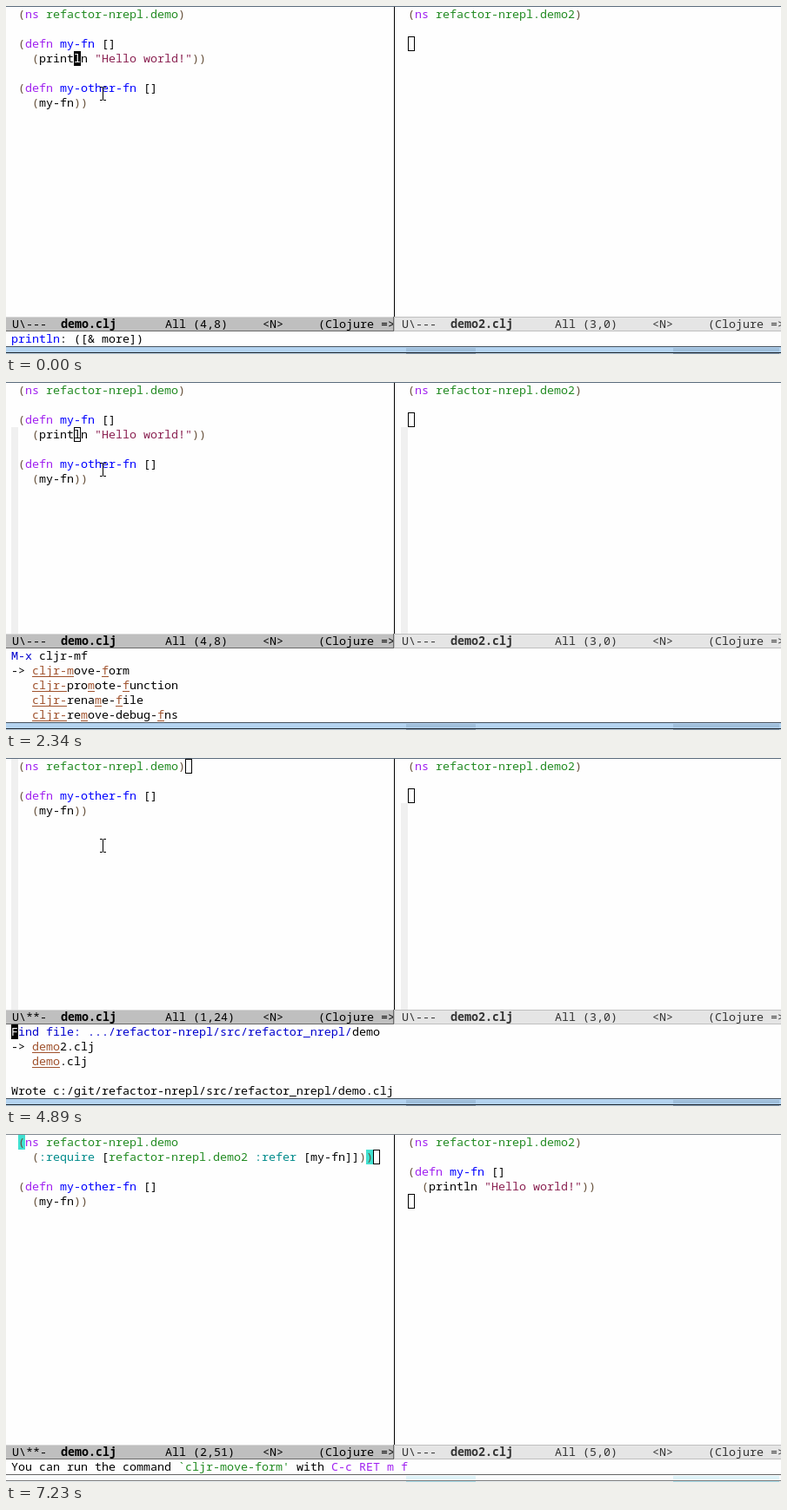
Write an HTML page with a canvas that moves like this. It is 891 by 401 pixels and loops after 7330 ms.

```html
<!DOCTYPE html>
<html lang="en">
<head>
<meta charset="utf-8">
<title>Move form</title>
<style>
html, body { margin: 0; width: 100%; height: 100%; overflow: hidden; background: #fefefe; }
canvas { display: block; }
</style>
</head>
<body>
<canvas id="stage" width="891" height="401"></canvas>
<script>
const ctx = document.getElementById('stage').getContext('2d', { alpha: false });
const LOOP = 7330, W = 891, H = 401, CW = 8, RH = 17;
const LEFT = 14, RIGHT = 462, MINI = 6, SPLIT = 446;
const FONT = '13.333px "Noto Sans Mono", "DejaVu Sans Mono", monospace';
const C = {
  bg: '#fefefe', ink: '#000', dim: '#66503a', key: '#a020f0', type: '#228b22',
  fn: '#0000ff', str: '#8b2252', kw: '#008b8b', prompt: '#0000cd',
  match: '#a0522d', paren: '#40e0d0', fringe: '#f0f0f0'
};

const rowY = row => 1 + row * RH;

function rect(x, y, w, h, color) {
  ctx.fillStyle = color;
  ctx.fillRect(x, y, w, h);
}

// Draws text at a row and returns the x where it ends.
function text(s, x, row, color = C.ink, bold = false) {
  ctx.font = (bold ? 'bold ' : '') + FONT;
  ctx.fillStyle = color;
  ctx.fillText(s, x, rowY(row) + 13);
  return x + s.length * CW;
}

function block(x, row, ch = '') {
  rect(x, rowY(row), CW, RH, '#000');
  text(ch, x, row, '#fff');
}

function hollow(x, row) {
  ctx.strokeStyle = '#000';
  ctx.lineWidth = 1;
  ctx.strokeRect(x + .5, rowY(row) + .5, CW - 1, RH - 1);
}

function tokenColor(tok, prev) {
  if (/[()]/.test(tok)) return C.dim;
  if (tok[0] === '"') return C.str;
  if (tok[0] === ':') return C.kw;
  if (tok === 'ns' || tok === 'defn') return C.key;
  if (prev === 'defn') return C.fn;
  return tok.startsWith('refactor-') ? C.type : C.ink;
}

function code(lines, x0) {
  lines.forEach((line, row) => {
    let x = x0, prev = '';
    for (const tok of line.match(/"[^"]*"|[()\[\]]|:?[\w.-]+|\s+/g) || []) {
      x = text(tok, x, row, tokenColor(tok, prev));
      if (tok.trim()) prev = tok;
    }
  });
}

const FORM = ['(defn my-fn []', '  (println "Hello world!"))'];
const CALL = ['(defn my-other-fn []', '  (my-fn))'];
const NS = '(ns refactor-nrepl.demo)', NS2 = '(ns refactor-nrepl.demo2)';
const BEFORE = [NS, '', ...FORM, '', ...CALL];
const CUT = [NS, '', ...CALL];
const AFTER = ['(ns refactor-nrepl.demo', '  (:require [refactor-nrepl.demo2 :refer [my-fn]]))', '', ...CALL];
const TARGET = [NS2, '', ...FORM];

function modeLine(x, w, row, active, flags, file, pos) {
  const y = rowY(row), ink = active ? '#000' : '#333', x0 = active ? 7 : 455;
  const light = active ? '#d8d8d8' : '#bfbfbf', dark = active ? '#6a6a6a' : '#bfbfbf';
  rect(x, y, w, RH, active ? '#bfbfbf' : '#e5e5e5');
  const put = (s, col, bold) => text(s, x0 + col * CW, row, ink, bold);
  ctx.save();
  ctx.beginPath();
  ctx.rect(x, y, w, RH);
  ctx.clip();
  put(flags, 0);
  put(file, 7, true);
  put('All ' + pos, 22);
  put('<N>', 36);
  put('(Clojure =>', 44);
  ctx.restore();
  rect(x, y, w, 1, light);
  rect(x, y + RH - 1, w, 1, dark);
  if (active) rect(x + w - 1, y, 1, RH, dark);
  else rect(x, y, 1, RH, light);
}

// Underlines the query letters as they appear in order.
function candidate(s, query, row) {
  let next = 0;
  [...s].forEach((ch, i) => {
    const x = 30 + i * CW, hit = next < query.length && ch === query[next];
    text(ch, x, row, hit ? C.match : C.ink);
    if (hit) {
      rect(x, rowY(row) + 15, CW, 1, C.match);
      next++;
    }
  });
}

const COMMANDS = ['cljr-unwind', 'cljr-clean-ns', 'cljr-move-form', 'cljr-rename-file'];
const MOVES = ['cljr-move-form', 'cljr-promote-function', 'cljr-rename-file', 'cljr-remove-debug-fns'];
const DEMOS = ['demo2.clj', 'demo.clj'];
const MX = 'M-x ', FIND = 'Find file: .../refactor-nrepl/src/refactor_nrepl/';

// Start time, prompt, typed text, candidates, cursor (end, start or none)
const PROMPTS = [
  [680, MX, '', ['ag', 'cd', 'cf', 'gl'], 'end'],
  [1070, MX, 'cl', COMMANDS, 'end'],
  [1200, MX, 'clj', COMMANDS, 'end'],
  [1340, MX, 'cljr-', COMMANDS, 'end'],
  [1770, MX, 'cljr-mf', MOVES, 'end'],
  [2340, MX, 'cljr-mf', MOVES, ''],
  [2490, MX, 'cljr-mf', MOVES, 'start'],
  [2640, FIND, '', ['analyzer.clj', 'artifacts.clj', 'client.clj', 'config.clj'], 'end'],
  [3380, FIND, 'd', [...DEMOS, 'extract_definition.clj', 'rename_file_or_dir.clj'], 'end'],
  [3530, FIND, 'de', [...DEMOS, 'extract_definition.clj', 'middleware.clj'], 'end'],
  [3810, FIND, 'demo', DEMOS, 'end'],
  [4210, FIND, 'demo', DEMOS, ''],
  [4740, FIND, 'demo', DEMOS, 'end'],
  [4890, FIND, 'demo', DEMOS, 'start']
];

const POINTER = [
  [0, 'beam', 111, 101], [2490, 'arrow', 109, 100], [4890, 'beam', 111, 101],
  [6420, 'arrow', 480, 180], [6550, 'arrow', 757, 281],
  [6690, 'arrow', 877, 384], [6810, '']
];

const at = (list, t) => list.filter(e => e[0] <= t).pop();

function minibuffer(t) {
  const [, prompt, typed, list, cursor] = at(PROMPTS, t);
  const end = text(typed, text(prompt, MINI, 18, C.prompt), 18);
  text('->', MINI, 19);
  list.forEach((s, i) => candidate(s, typed, 19 + i));
  if (cursor === 'end') block(end, 18);
  if (cursor === 'start') block(MINI, 18, prompt[0]);
  if (t >= 4890) text('Wrote c:/git/refactor-nrepl/src/refactor_nrepl/demo.clj', MINI, 22);
}

function echo(parts) {
  let x = MINI;
  for (const [s, color] of parts) x = text(s, x, 22, color);
}

function pointer(t) {
  const [, kind, x, y] = at(POINTER, t);
  if (kind === 'beam') {
    rect(x, y - 7, 1, 14, '#000');
    for (const dy of [-8, 7]) {
      rect(x - 3, y + dy, 3, 1, '#000');
      rect(x + 1, y + dy, 3, 1, '#000');
    }
  } else if (kind === 'arrow') {
    const path = new Path2D('M.5 .5V16.5L4.3 12.9L6.8 18.5L9 17.5L6.6 12H11.5Z');
    ctx.save();
    ctx.translate(x, y);
    ctx.fillStyle = '#fff';
    ctx.fill(path);
    ctx.strokeStyle = '#000';
    ctx.lineWidth = 1;
    ctx.stroke(path);
    ctx.restore();
  }
}

function frameEdge(focused) {
  rect(0, 0, W, 1, focused ? '#5b6b7c' : '#808890');
  rect(0, 392, W, 1, focused ? '#46525e' : '#666');
  rect(0, 393, W, 6, focused ? '#b4d3f0' : '#fafcfd');
  const shade = focused ? 'rgba(50,75,100,' : 'rgba(70,190,220,';
  rect(0, 400, W, 1, focused ? '#c3d7e8' : '#f4fafc');
  for (const [x, w] of [[460, 80], [767, 122]]) {
    rect(x, 394, w, 4, shade + '.15)');
    rect(x, 400, w, 1, shade + '.4)');
  }
  rect(0, 399, W, 1, focused ? '#1c242c' : '#777');
}

function draw(t) {
  const asking = t >= 680 && t < 5030, done = t >= 5030, cut = t >= 2490;
  const focused = t < 7230, bar = asking ? 17 : 21;
  rect(0, 0, W, H, C.bg);
  if (asking) {
    const top = cut ? 1 : 52;
    rect(6, top, CW, 290 - top, C.fringe);
    rect(454, 52, CW, 238, C.fringe);
  }
  if (t >= 6550 && focused) rect(454, 18, CW, 282, C.fringe);
  rect(SPLIT, 1, 1, rowY(bar) - 1, '#000');

  if (t >= 5180) {
    rect(LEFT, rowY(0), CW, RH, C.paren);
    rect(LEFT + 50 * CW, rowY(1), CW, RH, C.paren);
  }
  code(done ? AFTER : cut ? CUT : BEFORE, LEFT);
  code(done ? TARGET : [NS2], RIGHT);
  hollow(RIGHT, done ? 4 : 2);

  const caret = LEFT + 51 * CW;
  if (t < 400) block(78, 3, 'l');
  else if (asking) cut ? hollow(LEFT + 24 * CW, 0) : hollow(78, 3);
  else if (!focused) hollow(caret, 1);
  else if (done && (t < 5560 || (t >= 6120 && t < 6550) || t >= 7070)) block(caret, 1);

  modeLine(0, SPLIT, bar, true, cut ? 'U\\**-' : 'U\\---', 'demo.clj',
    done ? '(2,51)' : cut ? '(1,24)' : '(4,8)');
  modeLine(SPLIT, W - SPLIT, bar, false, 'U\\---', 'demo2.clj', done ? '(5,0)' : '(3,0)');

  if (asking) minibuffer(t);
  else if (done) echo([['You can run the command '], ['`cljr-move-form\'', C.type], [' with '], ['C-c RET m f', C.key]]);
  else echo([['println', C.fn], [': ([& more])']]);

  frameEdge(focused);
  pointer(t);
}

function tick() {
  draw(performance.now() % LOOP);
  requestAnimationFrame(tick);
}
tick();
</script>
</body>
</html>
```
